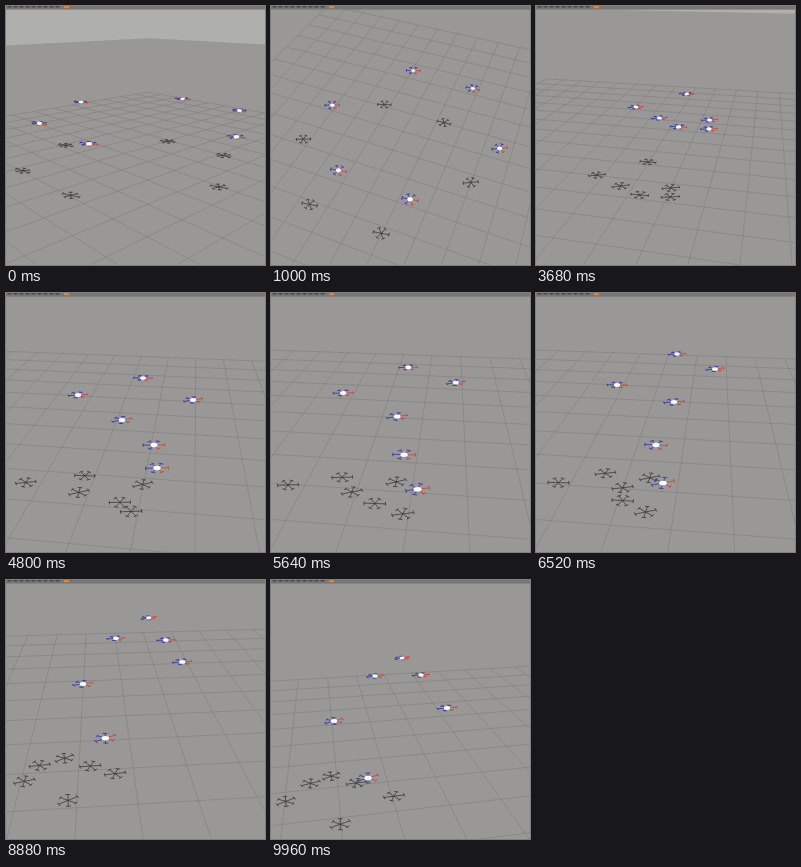
Write an HTML page that moves like this. It is 259 by 259 pixels and loops after 10 s.

```html
<!DOCTYPE html>
<html lang="en">
<head>
<meta charset="utf-8">
<title>Drone swarm</title>
<style>
html, body { margin: 0; width: 100%; height: 100%; overflow: hidden; background: #999896; }
svg { display: block; width: 100vw; height: 100vh; }
path { fill: none; stroke-linecap: round; }
</style>
</head>
<body>
<svg id="stage" viewBox="0 0 259 259">
  <rect width="259" height="259" fill="#afafae"/>
  <path id="ground" style="fill:#999896"/>
  <path id="grid" stroke="#7e7e7c" stroke-width=".55"/>
  <path id="shadows" stroke="#3c3c3b" stroke-width=".8"/>
  <g id="drones"></g>
  <rect width="259" height="3.6" fill="#777674"/>
  <path d="M2 .8H56" stroke="#4b4946" stroke-width="1.4" stroke-dasharray="3 3"/>
  <rect x="58" width="5" height="2.2" fill="#e08238"/>
</svg>
<script>
const LOOP = 10000, STEP = 40, F = 420, MID = 130, NEAR = 0.4, FLY = 1.2, SPAN = 0.2;
const rad = d => d * Math.PI / 180;
const $ = id => document.getElementById(id);
const mix = (a, b, k) => a + (b - a) * k;

// camera holds; drop, fade and lean place a shadow below its drone
const view = (from, to, x, y, h, yaw, pitch, drop, fade, lean) =>
  ({ from, to, x, y, h, yaw, pitch, drop, fade, lean });
const views = [
  view(0, 0, 6, -6, 4, -46.7, 16, 24, -.2, .35),
  view(1000, 1040, 1, -7.1, 11.4, -22, 47, 34, 0, .85),
  view(2080, 4180, 1.1, -9.9, 5.4, -13, 21.6, 68, 0, .57),
  view(4900, 7300, -.5, -4.2, 4.6, -6.4, 27.1, 162, .7, .6),
  view(8300, 9380, -1.5, -4.3, 4.6, 5, 28.2, 165, .65, .6),
  view(9960, LOOP, -2.1, -4.2, 4.6, 10.8, 22.6, 165, .6, .6)
];

function cameraAt(t) {
  const i = views.findLastIndex(v => t >= v.from);
  const a = views[i], b = views[i + 1] || a;
  const k = t > a.to ? (t - a.to) / (b.from - a.to) : 0;
  const c = {};
  for (const key in a) c[key] = mix(a[key], b[key], k);
  c.sy = Math.sin(rad(c.yaw));
  c.cy = Math.cos(rad(c.yaw));
  c.sp = Math.sin(rad(c.pitch));
  c.cp = Math.cos(rad(c.pitch));
  return c;
}

// world point to camera space: right, down, depth
function toCam(c, x, y, z) {
  const dx = x - c.x, dy = y - c.y, down = c.h - z;
  const ahead = dx * c.sy + dy * c.cy;
  return [dx * c.cy - dy * c.sy, down * c.cp - ahead * c.sp, ahead * c.cp + down * c.sp];
}
const toScreen = p => [MID + F * p[0] / p[2], MID + F * p[1] / p[2]];

function toWorld(c, x, y, z) {
  const a = (x - MID) / F, b = (y - MID) / F;
  const t = (c.h - z) / (c.sp + b * c.cp);
  const right = a * t, ahead = (c.cp - b * c.sp) * t;
  return [c.x + right * c.cy + ahead * c.sy, c.y - right * c.sy + ahead * c.cy];
}

const fmt = p => p[0].toFixed(2) + ' ' + p[1].toFixed(2);
const line = (a, b) => 'M' + fmt(a) + 'L' + fmt(b);

// keep the part of a shape in front of the camera
function clip(pts, closed) {
  const out = [];
  pts.forEach((p, i) => {
    if (p[2] >= NEAR) out.push(p);
    if (!closed && i === pts.length - 1) return;
    const q = pts[(i + 1) % pts.length];
    if ((p[2] < NEAR) !== (q[2] < NEAR)) {
      const k = (NEAR - p[2]) / (q[2] - p[2]);
      out.push(p.map((v, n) => mix(v, q[n], k)));
    }
  });
  return out.map(toScreen);
}

function gridPath(c) {
  let d = '';
  const add = (x1, y1, x2, y2) => {
    const s = clip([toCam(c, x1, y1, 0), toCam(c, x2, y2, 0)], false);
    if (s.length === 2) d += line(s[0], s[1]);
  };
  for (let i = -10; i <= 10; i++) {
    add(i, -10, i, 10);
    add(-10, i, 10, i);
  }
  return d;
}

// the swarm starts as a slightly uneven ring
const ring = [0, 1, 2, 3, 4, 5].map(k => {
  const a = rad(60 * k - 88 + 8 * Math.cos(rad(120 * (k - 1))));
  return [-2.4 + 3 * Math.sin(a), 2.3 + 3 * Math.cos(a)];
});

// then it flies through a few formations, given as seen on screen
const pose = (t, ...spots) => {
  const c = cameraAt(t);
  return { t, at: spots.map(([x, y]) => toWorld(c, x, y, FLY)) };
};
const route = [
  { t: 0, at: ring },
  { t: 1040, at: ring },
  pose(2520, [80, 104], [142, 84], [161, 119], [193, 122], [129, 115], [102, 115]),
  pose(4800, [72, 102], [137, 85], [187, 107], [148, 152], [151, 175], [116, 127]),
  pose(6520, [81, 92], [141, 61], [179, 76], [120, 152], [127, 190], [138, 109]),
  pose(9960, [104, 96], [131, 78], [176, 128], [63, 141], [97, 198], [150, 95])
];

// smooth curve through the route
function place(n, t) {
  const last = route.length - 1;
  const i = Math.min(last - 1, route.findLastIndex(r => t >= r.t));
  const span = route[i + 1].t - route[i].t, k = (t - route[i].t) / span;
  const k2 = k * k, k3 = k2 * k;
  return [0, 1].map(ax => {
    const at = j => route[j].at[n][ax];
    const slope = j => j < 2 || j === last ? 0 :
      (at(j + 1) - at(j - 1)) / (route[j + 1].t - route[j - 1].t) * span;
    return at(i) * (2 * k3 - 3 * k2 + 1) + slope(i) * (k3 - 2 * k2 + k) +
      at(i + 1) * (3 * k2 - 2 * k3) + slope(i + 1) * (k3 - k2);
  });
}

// six thin arms, each with a small propeller at its tip
function craft(c, pos, z, turn) {
  const p = toCam(c, pos[0], pos[1], z), o = toScreen(p);
  const size = F * SPAN / (p[2] * .5 + 4);
  const flat = p[1] / p[2] * c.cp + c.sp;
  const spot = (r, a) => {
    const x = Math.cos(a), y = Math.sin(a);
    return [o[0] + size * r * (x * c.cy - y * c.sy),
            o[1] - size * r * flat * (x * c.sy + y * c.cy)];
  };
  const arms = [];
  for (let k = 0; k < 6; k++) {
    const a = rad(k * 60 + 15 + turn), r = k % 3 ? .8 : 1;
    arms.push(line(o, spot(r, a)) + line(spot(r, a - .2), spot(r, a + .25)));
  }
  return { o, size, flat, arms };
}

function make(tag, attrs, parent) {
  const el = document.createElementNS('http://www.w3.org/2000/svg', tag);
  for (const k in attrs) el.setAttribute(k, attrs[k]);
  return parent.appendChild(el);
}
const drones = ring.map(() => {
  const g = make('g', {}, $('drones'));
  return {
    blue: make('path', { stroke: '#3434a8', 'stroke-width': .8 }, g),
    red: make('path', { stroke: '#cf4038', 'stroke-width': .8 }, g),
    body: make('ellipse', { fill: '#f8f8ff' }, g)
  };
});

function draw(t) {
  const c = cameraAt(t);
  const corners = [[-50, -50], [50, -50], [50, 50], [-50, 50]].map(p => toCam(c, ...p, 0));
  $('ground').setAttribute('d', 'M' + clip(corners, true).map(fmt).join('L') + 'Z');
  $('grid').setAttribute('d', gridPath(c));
  let shadows = '';
  drones.forEach((el, n) => {
    const turn = Math.sin(n * 2.3 + t / 1600) * 14;
    const d = craft(c, place(n, t), FLY, turn);
    const [x, y] = d.o;
    el.blue.setAttribute('d', d.arms.slice(1, 5).join(''));
    el.red.setAttribute('d', d.arms[0] + d.arms[5]);
    el.body.setAttribute('cx', x);
    el.body.setAttribute('cy', y);
    el.body.setAttribute('rx', d.size * .32);
    el.body.setAttribute('ry', d.size * .32 * Math.max(.6, d.flat));

    const drop = Math.max(6, c.drop - c.fade * y);
    const foot = toWorld(c, x - c.lean * drop, y + drop, 0);
    shadows += craft(c, foot, 0, turn).arms.join('');
  });
  $('shadows').setAttribute('d', shadows);
}

const start = performance.now();
function tick() {
  const t = (performance.now() - start) % LOOP;
  draw(Math.min(9960, Math.floor(t / STEP) * STEP));
  requestAnimationFrame(tick);
}
tick();
</script>
</body>
</html>
```
